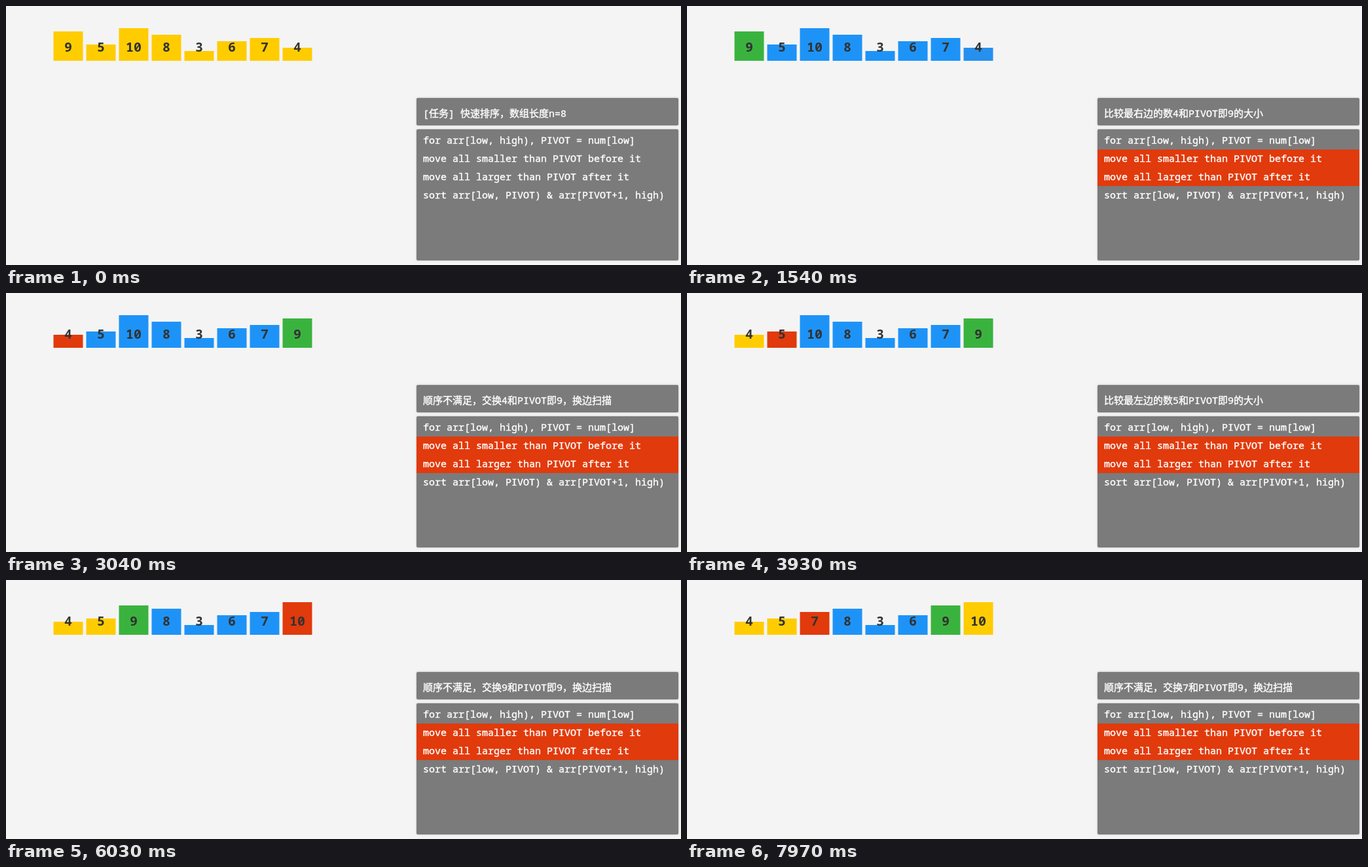
These frames come from a looping animation (1031x397 px, 8 s). An HTML page:

```html
<!DOCTYPE html>
<html lang="zh-CN">
<head>
<meta charset="utf-8">
<title>快速排序</title>
<style>
  html, body { margin: 0; width: 100%; height: 100%; overflow: hidden; background: #f4f4f4; }
  svg { display: block; width: 100vw; height: 100vh; }
  text { font-family: "Noto Sans Mono", "Noto Sans CJK SC", "Noto Sans CJK", monospace; }
  .bar text { font-size: 20px; font-weight: 700; fill: #333; text-anchor: middle; }
  .panel { fill: #7b7b7b; filter: drop-shadow(0 0 1.5px rgba(0, 0, 0, .25)); }
  .code { font-size: 15px; font-weight: 500; fill: #fff; stroke: #fff; stroke-width: .4px; }
</style>
</head>
<body>
<svg id="stage" viewBox="0 0 1031 397"></svg>
<script>
const LOOP = 8000, FADE = 310, TICK = 150;
const YELLOW = [255, 204, 0], BLUE = [30, 147, 247], GREEN = [58, 179, 62], RED = [225, 58, 12];
const values = [9, 5, 10, 8, 3, 6, 7, 4];
const code = [
  'for arr[low, high), PIVOT = num[low]',
  'move all smaller than PIVOT before it',
  'move all larger than PIVOT after it',
  'sort arr[low, PIVOT) & arr[PIVOT+1, high)'
];

const compare = (side, n) => `比较最${side}边的数${n}和PIVOT即9的大小`;
const swapped = n => `顺序不满足，交换${n}和PIVOT即9，换边扫描`;
const allBlue = Object.fromEntries(values.map(v => [v, v === 9 ? GREEN : BLUE]));

// colours: value -> new colour; swap: the two values trading places
const phases = [
  { at: 500, end: 940, text: '选择9作为本轮的PIVOT', colours: allBlue },
  { at: 1540, end: 1840, delay: -12, text: compare('右', 4), colours: { 4: RED } },
  { at: 2590, end: 3040, text: swapped(4), swap: [4, 9] },
  { at: 3490, end: 3930, text: compare('左', 5), colours: { 4: YELLOW, 5: RED } },
  { at: 4530, end: 4980, text: compare('左', 10), colours: { 5: YELLOW, 10: RED } },
  { at: 5580, end: 6030, text: swapped(9), swap: [10, 9] },
  { at: 6480, end: 6920, text: compare('右', 7), colours: { 10: YELLOW, 7: RED } },
  { at: 7520, end: 7970, text: swapped(7), swap: [7, 9] }
];

const stage = document.getElementById('stage');

function add(parent, tag, attrs, text) {
  const el = document.createElementNS('http://www.w3.org/2000/svg', tag);
  for (const key in attrs) el.setAttribute(key, attrs[key]);
  if (text !== undefined) el.textContent = text;
  return parent.appendChild(el);
}

const bars = values.map(v => {
  const g = add(stage, 'g', { class: 'bar' });
  const rect = add(g, 'rect', { x: -22.5, y: 84 - 5 * v, width: 45, height: 5 * v });
  add(g, 'text', { x: 0, y: 70 }, v);
  return { v, g, rect };
});

const panel = (y, height) => add(stage, 'rect', { class: 'panel', x: 627, y, width: 400, height, rx: 2 });
panel(141, 42);
panel(189, 201);
const red = `rgb(${RED})`;
const first = add(stage, 'path', { d: 'M627 220V191a2 2 0 0 1 2-2H1025a2 2 0 0 1 2 2V220z', fill: red });
const middle = add(stage, 'rect', { x: 627, y: 220, width: 400, height: 56, fill: red });
const message = add(stage, 'text', { class: 'code', x: 637, y: 170 });
code.forEach((line, i) => add(stage, 'text', { class: 'code', x: 637, y: 211 + 28 * i }, line));

const mix = (a, b, p) => a + (b - a) * p;
const show = (el, on) => el.setAttribute('visibility', on ? 'visible' : 'hidden');

// Each phase advances in ticks of about 150 ms
function progress({ at, end, delay = 58 }, t) {
  const ticks = Math.round((end - at) / TICK);
  const k = Math.min(ticks, Math.floor((t - at) / (end - at) * ticks + 1e-6));
  return Math.max(0, Math.min(1, (k * TICK - delay) / FADE));
}

function draw(t) {
  const slot = {}, fill = {};
  values.forEach((v, i) => { slot[v] = i; fill[v] = YELLOW; });
  let text = '[任务] 快速排序，数组长度n=8';

  for (const phase of phases) {
    if (t < phase.at) break;
    const p = progress(phase, t);
    text = phase.text;
    for (const v in phase.colours)
      fill[v] = fill[v].map((c, i) => mix(c, phase.colours[v][i], p));
    if (phase.swap) {
      const [a, b] = phase.swap;
      [slot[a], slot[b]] = [mix(slot[a], slot[b], p), mix(slot[b], slot[a], p)];
    }
  }

  for (const { v, g, rect } of bars) {
    g.setAttribute('transform', `translate(${95 + 50 * slot[v]} 0)`);
    rect.setAttribute('fill', `rgb(${fill[v].map(Math.round)})`);
  }
  if (message.textContent !== text) message.textContent = text;
  show(first, t >= phases[0].at && t < phases[1].at);
  show(middle, t >= phases[1].at);
}

const start = performance.now();
function frame() {
  draw((performance.now() - start) % LOOP);
  requestAnimationFrame(frame);
}
frame();
</script>
</body>
</html>
```
